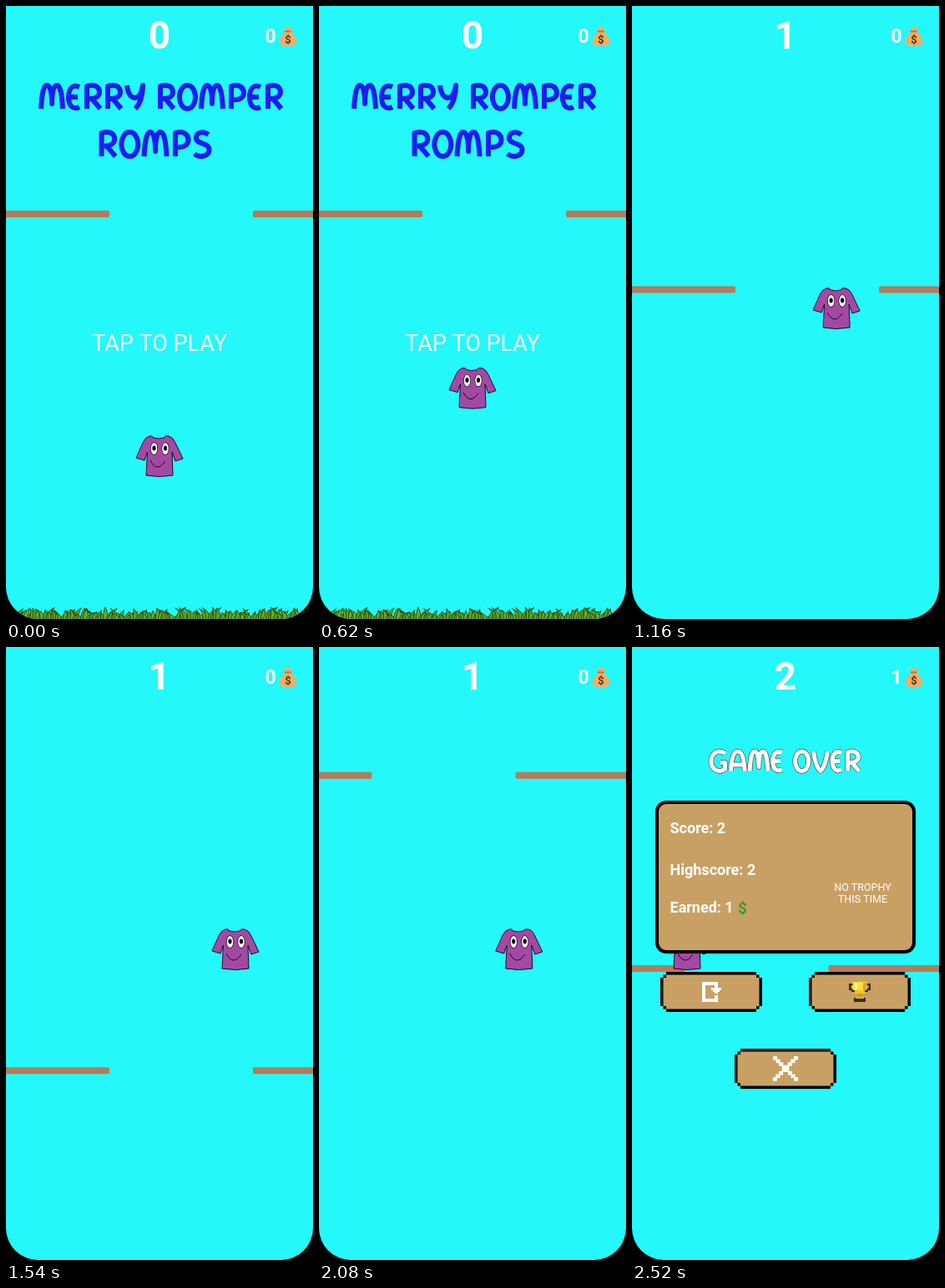
An HTML page with a canvas for the animation above (3360 ms loop, 368 by 734 pixels).

```html
<!DOCTYPE html>
<html lang="en">
<head>
<meta charset="utf-8">
<title>Merry Romper Romps</title>
<style>
  html, body { margin: 0; height: 100%; overflow: hidden; background: #000; }
  canvas { display: block; }
</style>
</head>
<body>
<canvas id="stage" width="368" height="734"></canvas>
<script>
const W = 368, H = 734, LOOP = 3360;
const HOP_START = 60, CRASH = 2520;
const TAPS = [808, 1655, 1870];
const SKY = '#24f8fa', TAN = '#c9a063', BROWN = '#b97a57';
const g = document.getElementById('stage').getContext('2d');

// Display lettering: [width, centre line], 28 units tall
const LETTERS = {
  A: [20, 'M0,28C1,10 4,0 10,0C16,0 19,10 20,28M2,19H18'],
  E: [13, 'M13,2C5,-2 0,4 0,14C0,24 5,30 13,26M1,14H11'],
  G: [21, 'M20,3C10,-4 0,3 0,14C0,25 10,32 20,25V16H13'],
  M: [26, 'M0,28C1,10 3,0 7,0C11,0 13,8 13,22C13,8 15,0 19,0C23,0 25,10 26,28'],
  O: [19, 'M9.5,0A9.5,14 0 1 1 9.4,0Z'],
  P: [18, 'M3,28V1C13,-2 18,3 18,9C18,15 12,18 6,17'],
  R: [18, 'M2,28V1C12,-2 17,2 17,8C17,13 12,16 5,16M8,16L18,28'],
  S: [17, 'M16,3C10,-2 2,0 2,7C2,14 17,12 17,20C17,28 6,30 0,25'],
  V: [20, 'M0,0C2,14 5,24 10,28C15,24 18,14 20,0'],
  Y: [19, 'M0,0C1,10 5,15 10,15C15,15 18,8 19,0C19,12 16,22 10,28'],
  ' ': [5, '']
};
for (const k in LETTERS) LETTERS[k][1] = new Path2D(LETTERS[k][1]);

const SHIRT = new Path2D('M17,1Q12,2 9,9L1,27L11,30L14.5,20L13,48Q29,51 45,48L44,20L48,31' +
  'L57,28L48,9Q45,2 40,1Q36,0 34,3Q28,5 22,3Q20,0 17,1Z');
const SMILE = new Path2D('M18,30Q22,38 27,38Q31,38 36,31');

function box(color, x, y, w, h) {
  g.fillStyle = color;
  g.fillRect(x, y, w, h);
}

function rounded(color, x, y, w, h, r) {
  g.fillStyle = color;
  g.beginPath();
  g.roundRect(x, y, w, h, r);
  g.fill();
}

function oval(color, x, y, rx, ry) {
  g.fillStyle = color;
  g.beginPath();
  g.ellipse(x, y, rx, ry, 0, 0, 7);
  g.fill();
}

function text(str, x, y, size, weight = 400, align = 'center', color = '#fff') {
  g.font = `${weight} ${size}px Roboto, sans-serif`;
  g.textAlign = align;
  g.fillStyle = color;
  g.fillText(str, x, y);
}

function lettering(str, cx, top, scale, color, weight) {
  const gap = 7;
  const width = [...str].reduce((sum, c) => sum + LETTERS[c][0] + gap, -gap);
  g.save();
  g.translate(cx - width * scale / 2, top);
  g.scale(scale, scale);
  g.strokeStyle = color;
  g.lineWidth = weight / scale;
  g.lineJoin = 'round';
  for (const c of str) {
    g.stroke(LETTERS[c][1]);
    g.translate(LETTERS[c][0] + gap, 0);
  }
  g.restore();
}

// Motion
const rise = d => 0.8547 * d - 0.0003806 * d * d;

function climb(t) {
  return TAPS.reduce((sum, tap, i) =>
    t > tap ? sum + rise(Math.min(t, TAPS[i + 1] ?? t) - tap) : sum, 0);
}

const DRIFT = [[808, 0], [880, 10], [1160, 61], [1540, 91], [2080, 56], [2520, -118]];

function drift(t) {
  if (t <= DRIFT[0][0]) return 0;
  const last = DRIFT.length - 1;
  const i = Math.min(last - 1, DRIFT.findLastIndex(p => p[0] <= t));
  const slope = k => {
    const a = DRIFT[Math.max(0, k - 1)], b = DRIFT[Math.min(last, k + 1)];
    return (b[1] - a[1]) / (b[0] - a[0]);
  };
  const [t0, x0] = DRIFT[i], [t1, x1] = DRIFT[i + 1];
  const d = t1 - t0, u = (t - t0) / d, v = 1 - u;
  return v * v * ((1 + 2 * u) * x0 + u * d * slope(i)) +
         u * u * ((3 - 2 * u) * x1 - v * d * slope(i + 1));
}

function shirtY(t) {
  if (t < HOP_START) return 514;
  if (t < TAPS[0]) return 412 + 102 * ((t - 447) / 387) ** 2;
  return Math.max(337, 500.7 - climb(t));
}

// Parts
function shirt(x, y) {
  g.save();
  g.translate(x, y);
  g.fillStyle = '#a349a4';
  g.strokeStyle = '#1a0a1a';
  g.lineWidth = 1;
  g.fill(SHIRT);
  g.stroke(SHIRT);
  g.stroke(SMILE);
  for (const ex of [22.5, 36]) {
    oval('#1a0a1a', ex, 16, 4.5, 7.7);
    oval('#fff', ex, 16, 3.8, 7);
    oval('#000', ex, 15.5, 2.1, 3);
  }
  g.restore();
}

function bars(y, left, right) {
  rounded(BROWN, -4, y, left + 4, 8, 2);
  rounded(BROWN, right, y, W - right + 4, 8, 2);
}

function moneyBag() {
  g.fillStyle = '#f2ad62';
  g.fill(new Path2D('M333,25Q336,27 338,24Q340,27 343,25L341,30Q348,37 348.5,43' +
    'Q348,48 338,48Q328,48 327.5,43Q328,37 335,30Z'));
  box('#b8733a', 334, 29.5, 7.5, 1.8);
  text('$', 338, 45, 13, 700, 'center', '#4e3420');
}

function grass() {
  let seed = 7;
  const rnd = () => (seed = seed * 16807 % 2147483647) / 2147483647;
  g.strokeStyle = '#1d3606';
  g.lineWidth = 0.8;
  for (let x = 2; x < W; x += 3) {
    const tip = x + rnd() * 20 - 10, top = 720 + rnd() * 7;
    g.fillStyle = rnd() < 0.5 ? '#5fa01e' : '#6cab24';
    g.beginPath();
    g.moveTo(x - 3, 736);
    g.quadraticCurveTo(x - 2, top + 4, tip, top);
    g.quadraticCurveTo(x + 3, top + 5, x + 4, 736);
    g.fill();
    g.stroke();
  }
}

function button(x, y) {
  const w = 122, h = 48, u = 3.5;
  const inset = (color, i, j) => box(color, x + i * u, y + j * u, w - 2 * i * u, h - 2 * j * u);
  inset('#000', 2, 0);
  inset('#000', 1, 1);
  inset('#000', 0, 2);
  inset(TAN, 2, 1);
  inset(TAN, 1, 2);
}

function restartIcon() {
  for (const r of [[84, 401, 4, 24], [84, 401, 18, 4], [84, 421, 19, 4], [99, 417, 4, 8],
    [99, 401, 4, 8], [95, 408, 12, 3], [97, 411, 8, 2], [99, 413, 4, 2]]) box('#fff', ...r);
}

function trophyIcon() {
  box('#3a2a08', 260, 403, 26, 8);
  box(TAN, 262.5, 405, 21, 4);
  box('#3a2a08', 263, 410, 20, 3);
  box('#ffe03c', 264.5, 401, 17, 10);
  box('#e0a818', 277, 402, 4, 9);
  box('#fff8b0', 267, 403, 3, 6);
  box('#f2c424', 267, 411, 12, 4);
  box('#d09a14', 271, 415, 4, 5);
  box('#3a2a08', 266, 420, 14, 5);
  box('#e8b820', 268, 419, 10, 2);
}

function crossIcon() {
  for (let i = 0; i < 8; i++) {
    const d = i * 3.6;
    box('#fff', 169 + d, 490 + d, 5, 4.5);
    box('#fff', 194 - d, 490 + d, 5, 4.5);
  }
}

function menu() {
  lettering('MERRY ROMPER', 186, 95, 1, '#1c1cf0', 6);
  lettering('ROMPS', 178, 151, 1.04, '#1c1cf0', 6);
  text('TAP TO PLAY', 184, 413, 27);
  grass();
}

function gameOver() {
  lettering('GAME OVER', 183.5, 125, 0.84, '#5a5048', 6.4);
  lettering('GAME OVER', 183.5, 125, 0.84, '#fff', 5);
  rounded('#000', 28, 184, 312, 183, 13);
  rounded(TAN, 32, 188, 304, 175, 9);
  text('Score: 2', 45.5, 223, 18, 700, 'left');
  text('Highscore: 2', 45.5, 273, 18, 700, 'left');
  text('Earned: 1', 45.5, 318, 18, 700, 'left');
  text('$', 132.5, 319, 19, 700, 'center', '#3c9a3c');
  text('NO TROPHY', 276.5, 292, 12.5);
  text('THIS TIME', 276.5, 306, 12.5);
  button(34, 389);
  button(212, 389);
  button(123, 481);
  restartIcon();
  trophyIcon();
  crossIcon();
}

function draw(now) {
  const clock = now % LOOP, t = Math.min(clock, CRASH);
  const barY = 245 + Math.max(0, climb(t) - 163.7);
  const second = barY > 728, y = second ? barY - 712 : barY;
  const over = clock >= CRASH;

  box('#000', 0, 0, W, H);
  g.save();
  g.beginPath();
  g.roundRect(0, 0, W, H, [0, 0, 38, 38]);
  g.clip();
  box(SKY, 0, 0, W, H);
  second ? bars(y, 63.5, 235.5) : bars(y, 124, 296);
  if (t < TAPS[0]) menu();
  shirt(155 + drift(t), shirtY(t));
  if (over) gameOver();
  text(second + (y >= 320), 184, 51, 46, 700);
  text(+over, 317, 44, 23, 700);
  moneyBag();
  g.restore();
  requestAnimationFrame(draw);
}
requestAnimationFrame(draw);
</script>
</body>
</html>
```
